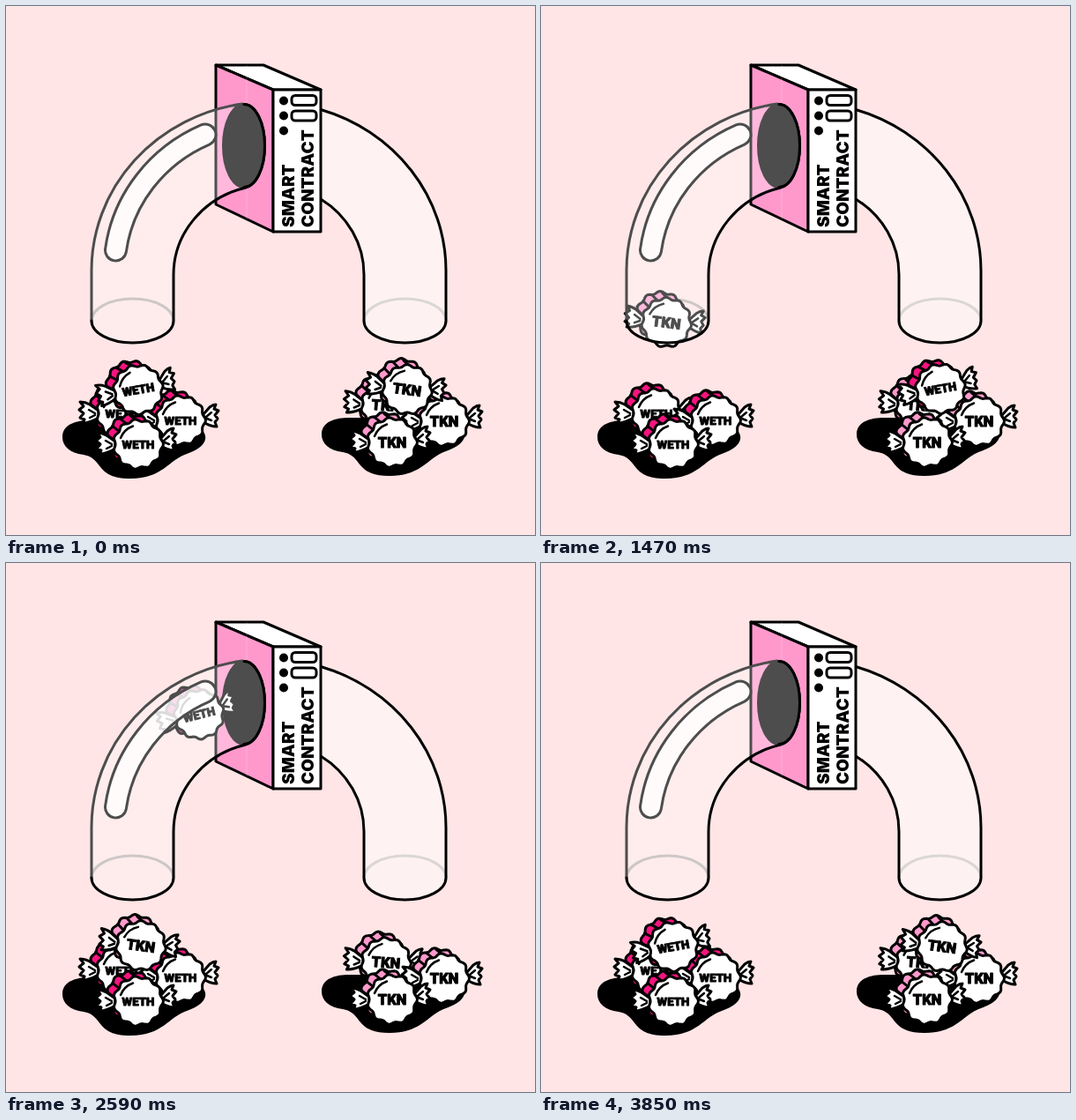
Write an HTML page that moves like this. It is 600 by 600 pixels and loops after 4.27 s.

```html
<!DOCTYPE html>
<html lang="en">
<head>
<meta charset="utf-8">
<title>Candy swap</title>
<style>
  html, body { margin: 0; width: 100%; height: 100%; overflow: hidden; background: #ffe5e5; }
  svg { display: block; width: 600px; height: 600px; }
  .line { fill: none; stroke: #000; stroke-width: 3; stroke-linejoin: round; stroke-linecap: round; }
  .soft { stroke: #4d4d4d; }
  .faint { stroke: #b8aeae; }
  .label { font: 900 19px Inter, sans-serif; }
  .candy { stroke: #000; stroke-width: 3; stroke-linejoin: round; stroke-linecap: round; }
  .candy text { font-family: Roboto, sans-serif; font-weight: 900; text-anchor: middle; stroke-width: .9; }
</style>
</head>
<body>
<svg viewBox="0 0 600 600">
  <defs>
    <clipPath id="outside">
      <path d="M0 0H271V600H0ZM357 0H600V600H357Z"/>
    </clipPath>
    <path id="shine" d="M124.500 277A175 168 0 0 1 226 146" fill="none" stroke-linecap="round"/>
    <mask id="rim" maskUnits="userSpaceOnUse" x="0" y="0" width="600" height="600">
      <use href="#shine" stroke="#fff" stroke-width="27"/>
      <use href="#shine" stroke="#000" stroke-width="21"/>
    </mask>
    <path id="shadow" d="M64 489C64 474 80 470 95 470H200C232 478 236 497 205 508C184 515 178 536 141 536C101 536 111 513 88 509C72 507 64 499 64 489Z"/>
  </defs>

  <g id="machine" stroke="#000" stroke-width="3" stroke-linejoin="round">
    <path d="M238 67H292L357 95H303Z" fill="#fff"/>
    <path d="M238 67L303 95V256L238 225Z" fill="#ff99cc"/>
    <path d="M273 67V242" stroke="#fff" stroke-width="1" opacity=".2"/>
    <ellipse cx="270" cy="158.500" rx="23.500" ry="47"/>
  </g>

  <g id="mouths">
    <ellipse cx="143.500" cy="357" rx="46.500" ry="25" fill="#f6dada" opacity=".25"/>
    <ellipse cx="452.500" cy="357" rx="46.500" ry="25" fill="#f6dada" opacity=".25"/>
    <path class="line faint" d="M97 357A46.500 25 0 0 1 190 357M406 357A46.500 25 0 0 1 499 357"/>
  </g>

  <use href="#shadow"/>
  <use href="#shadow" x="294" y="-3"/>
  <g id="back"></g>
  <g id="movers" clip-path="url(#outside)"></g>

  <g id="glass">
    <path d="M97 357V300A201 191 0 0 1 268 111A24 47 0 0 1 272 206A108 102 0 0 0 190 305V357A46.500 25 0 0 1 97 357Z" fill="#fff" opacity=".3"/>
    <path d="M357 117.500A201 191 0 0 1 499 300V357A46.500 25 0 0 1 406 357V305A108 102 0 0 0 357 219Z" fill="#fff" opacity=".5"/>
    <path class="line soft" d="M97 357V300A201 191 0 0 1 268 111"/>
    <path class="line" d="M270 111.500A23.500 47 0 0 1 270 205.500"/>
    <path class="line" d="M272 206A108 102 0 0 0 190 305V357A46.500 25 0 0 1 97 357"/>
    <path class="line" d="M357 117.500A201 191 0 0 1 499 300V357A46.500 25 0 0 1 406 357V305A108 102 0 0 0 357 219"/>
    <use href="#shine" stroke="#fff" stroke-width="23" opacity=".8"/>
    <rect width="600" height="600" fill="#4d4d4d" mask="url(#rim)"/>
  </g>

  <g id="panel">
    <rect x="303" y="95" width="54" height="161" fill="#fff" stroke="#000" stroke-width="3" stroke-linejoin="round"/>
    <circle cx="315" cy="107.500" r="5"/>
    <circle cx="315" cy="124.500" r="5"/>
    <circle cx="315" cy="141.500" r="5"/>
    <g fill="#fff" stroke="#000" stroke-width="3">
      <rect x="324" y="101.500" width="28" height="11" rx="4"/>
      <rect x="324" y="119" width="28" height="11" rx="4"/>
    </g>
    <text class="label" transform="translate(327 251) rotate(-90)">SMART</text>
    <text class="label" transform="translate(349 251) rotate(-90)">CONTRACT</text>
  </g>
  <g id="front"></g>
</svg>
<script>
const $ = id => document.getElementById(id);
const STEP = 70, LOOP = 4270, LAST = 3850, TRIP = 1050;

const KINDS = {
  WETH: { color: '#f5147f', size: 13.3, drop: 5 },
  TKN: { color: '#ff99cc', size: 16.5, drop: 6 }
};

// Scalloped wrapper edge
function scallop(r) {
  let d = '';
  for (let i = 0; i < 88; i++) {
    const a = i / 88 * 2 * Math.PI;
    const k = r + 1.3 * Math.cos(11 * a);
    d += (i ? 'L' : 'M') + (k * Math.cos(a)).toFixed(1) + ' ' + (k * Math.sin(a)).toFixed(1);
  }
  return d + 'Z';
}
const DISC = scallop(27.2);

function ribs() {
  let d = '';
  for (const deg of [188, 214, 240, 266]) {
    const a = deg * Math.PI / 180;
    d += `M${27 * Math.cos(a)} ${27 * Math.sin(a)}l-7 -5.500`;
  }
  return d;
}

function candy(name, x, y, turn = 0) {
  const { color, size, drop } = KINDS[name];
  return `<g class="candy" transform="translate(${x} ${y}) rotate(${turn})">
    <path d="${DISC}" transform="translate(-7.500 -6)" fill="${color}"/>
    <path d="${ribs()}" fill="none"/>
    <path d="M-26 -3L-36 -10Q-41 -13 -47 -13L-43 -8L-48 -4L-43 0L-47 5L-42 7L-44 11Q-36 11 -26 5Z" fill="#fff"/>
    <path d="M26 -7L33 -15Q37 -18 40 -18L38 -13L43 -11L39 -6L42 -2L39 2L41 7Q34 7 26 2Z" fill="#fff"/>
    <path d="M-30 0L-37 -4M-30 2L-36 5M29 -4L35 -9M30 -2L35 0" fill="none" stroke-width="2.500"/>
    <path d="${DISC}" fill="#fff"/>
    <path d="M-20 -7Q-16 -17 -6 -20.500" fill="none" stroke-width="2.500"/>
    <text y="${drop}" font-size="${size}">${name}</text>
  </g>`;
}

$('back').innerHTML =
  candy('WETH', 131, 462) + candy('WETH', 198, 470) +
  candy('TKN', 431, 453, 4) + candy('TKN', 497, 471);
$('front').innerHTML = candy('WETH', 150, 497) + candy('TKN', 438, 495);
$('movers').innerHTML = candy('WETH', 0, 0) + candy('TKN', 0, 0);

function route(left, right) {
  const p = document.createElementNS('http://www.w3.org/2000/svg', 'path');
  p.setAttribute('d', `M${left}C141 400 141 340 143 305C143 235 185 165 270 158H350
    C400 167 446 228 453 305C453 350 453 400 ${right}`);
  return p;
}

const [weth, tkn] = $('movers').children;
const movers = [
  { el: weth, path: route('150 435', '453 434'), turn: -10, sway: -4, go: 0, back: 2010, home: 0 },
  { el: tkn, path: route('153 434', '455 435'), turn: 8, sway: -2, go: 2800, back: 675, home: 1 }
];

function ease(t) {
  t = Math.min(1, Math.max(0, t));
  return t < .5 ? .5 * (2 * t) ** 2.2 : 1 - .5 * (2 - 2 * t) ** 2.2;
}

function draw(t) {
  for (const m of movers) {
    const f = m.home + ease((t - m.go) / TRIP) - ease((t - m.back) / TRIP);
    const at = m.path.getPointAtLength(f * m.path.getTotalLength());
    const turn = m.turn + m.sway * Math.sin(Math.PI * f);
    m.el.setAttribute('transform', `translate(${at.x} ${at.y}) rotate(${turn})`);
  }
}

const start = performance.now();
function tick(now) {
  const t = Math.max(0, now - start) % LOOP;
  draw(Math.min(LAST, Math.floor(t / STEP) * STEP));
  requestAnimationFrame(tick);
}
draw(0);
requestAnimationFrame(tick);
</script>
</body>
</html>
```
